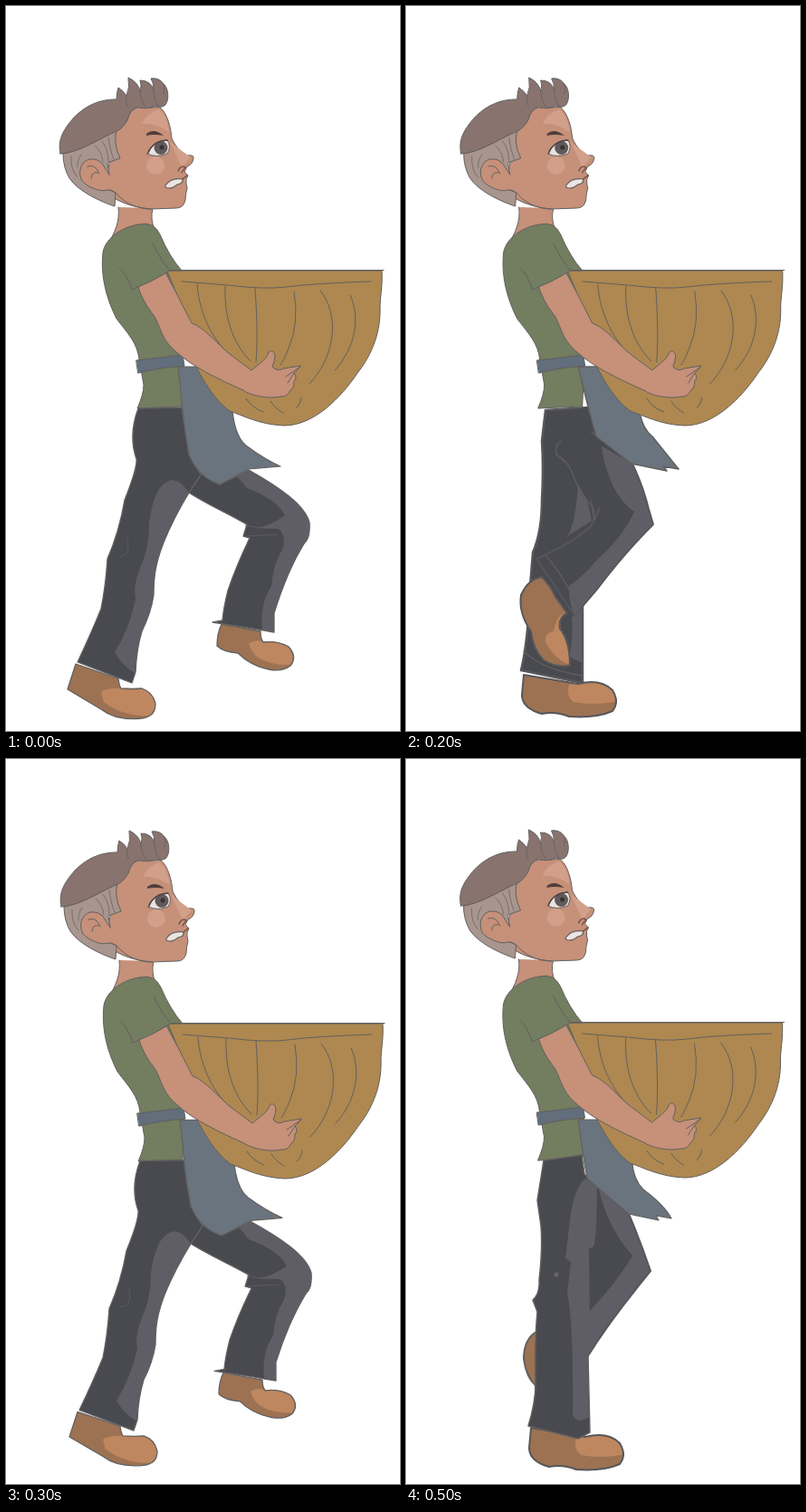
These frames come from a looping animation (435x800 px, 0.6 s). An HTML page:

```html
<!DOCTYPE html>
<html lang="en">
<head>
<meta charset="utf-8">
<title>Walking with a basket</title>
<style>
html, body { margin: 0; width: 100%; height: 100%; overflow: hidden; background: #fff; }
svg { display: block; width: 100%; height: 100%; }
</style>
</head>
<body>
<svg id="stage" viewBox="0 0 435 800" stroke-linejoin="round" stroke-linecap="round"></svg>
<script>
const DARK = '#494950', GREY = '#5f5e67', BOOT = '#9c7253', TAN = '#be875f',
  SKIN = '#c69079', GLOW = '#d2a08a', HAIR = '#88736f', SIDES = '#a8958d',
  SHIRT = '#737d60', CLOTH = '#6a747e', WICKER = '#ae8850', INK = '#62605f';

const fill = (color, d) => `<path fill="${color}" d="${d}"/>`;
const line = (d, w = 1, color = INK) => `<path fill="none" stroke="${color}" stroke-width="${w}" d="${d}"/>`;
const shape = (color, d, w = 1) => fill(color, d) + line(d, w);
const group = (move, s) => `<g transform="${move}">${s}</g>`;
// a shaded part: base, lit side, then the outline over both
const part = (base, lit, d, light, w) => fill(base, d) + fill(lit, light) + line(d, w, w > 1.5 ? '#57575a' : INK);
const leg = (d, light, w) => part(DARK, GREY, d, light, w);
const boot = (d, light, w) => part(BOOT, TAN, d, light, w);
const apron = (d, w = 1) => shape(CLOTH, 'M190 398H212' + d, w);

const torso =
  shape(SKIN, 'M124 222C126 238 120 250 112 264L150 258L164 246Q159 236 162 223') +
  shape(SHIRT, 'M147 241Q163 237 170 252Q180 276 194 292L184 300L190 350L196 398L194 442L145 444Q152 428 152 418L147 390C145 372 135 362 122 345C112 325 104 300 107 272C110 255 130 243 147 241Z');

const belt = shape('#626e7b', 'M144 391L195 385L197 397Q170 399 146 405Z');

const basket =
  shape(WICKER, 'M178 292H415C416 310 413 320 413 333C414 365 400 390 388 405C370 432 340 463 307 463C280 462 262 452 247 447C230 435 217 412 209 396L200 345Z') +
  line('M178 291.5H417M194 304L245 308Q285 313 310 310Q340 306 403 304') +
  line('M211 307C213 335 225 365 246 384M242 309C241 340 248 370 270 392M275 311C277 340 278 370 276 393') +
  line('M318 315Q324 350 312 378Q306 392 303 396M347 314C368 340 365 385 335 417M380 319C392 345 385 378 363 402') +
  line('M265 433Q271 443 284 448M292 436Q297 444 306 449M326 432Q325 440 320 444');

const arm =
  shape(SKIN, 'M145 307Q165 303 176 294Q190 320 205 350C220 355 235 375 247 384L271 402C280 394 288 390 290 382Q294 378 297 385Q297 392 294 398Q300 404 306 400L325 397Q322 402 318 405Q322 410 318 414Q318 422 314 424Q310 432 303 431C290 434 270 430 262 424C235 412 205 398 186 380C170 366 170 350 162 340Q150 325 145 307Z') +
  line('M325 398L309 409M318 405L311 416') +
  fill(SHIRT, 'M125 289Q134 297 139 313Q160 305 181 292L165 262Z') +
  line('M125 289Q134 297 139 313Q160 305 181 292L193 292M162 262Q171 281 181 292');

const head =
  shape(SKIN, 'M122 136L134 126C136 116 142 112 148 112C158 114 166 110 170 112C178 118 182 134 183 146C188 157 194 162 200 165Q208 164 207 168Q206 175 200 177L197 183L201 187Q198 191 199 196L200 201Q198 208 198 214Q196 223 188 223L160 224Q137 222 121 213L110 195Z') +
  fill(GLOW, 'M150 130Q156 117 169 114Q178 122 180 139Q163 128 150 130ZM181 150L204 167L194 178Q188 164 181 150Z') +
  `<circle cx="165" cy="176" r="10" fill="${GLOW}"/>` +
  shape(SIDES, 'M63 163C80 160 100 150 122 136Q118 152 126 168L112 173L114 186L112 202L121 206L120 221C105 216 80 205 70 190Q63 178 63 163Z') +
  line('M98 154Q106 161 107 172M106 149Q113 158 113 171M113 145Q115 160 119 169M72 166Q71 181 79 189M83 164Q78 171 79 178', .7) +
  shape(SKIN, 'M121 206Q116 202 112 203C105 206 90 200 84 193C79 184 82 172 92 169Q102 168 107 175Q110 180 114 186') +
  line('M90 177Q99 174 103 185M94 190Q95 182 101 184M121 206C133 220 148 224 160 224') +
  shape(HAIR, 'M60 163C57 148 62 138 75 123C90 108 105 103 122 103Q122 96 124 90Q130 94 133 99Q137 90 135 79Q146 84 148 94Q150 87 148 82Q160 82 163 93Q163 85 160 80C168 79 172 83 174 86C180 91 180 104 176 109C172 113 167 111 165 110C158 114 148 113 146 111C138 114 136 120 134 126Q128 137 118 140C100 148 80 162 60 163Z') +
  line('M148 94Q148 104 154 111M163 93Q163 103 168 110M174 86Q176 92 174 97M133 99Q131 104 134 110', .8) +
  fill('#4f3d3a', 'M155 141Q163 134 174 143Q163 141 155 143Z') +
  shape('#e9e3df', 'M156 163Q160 150 178 148Q183 155 178 163Q166 168 156 163Z') +
  '<circle cx="171" cy="156.500" r="7.500" fill="#62595a"/><circle cx="172" cy="156" r="2.500" fill="#333"/>' +
  line('M157 162Q162 149 178 148', 1.5, '#4a4141') +
  shape('#ebe4df', 'M176 198Q182 189 195 191Q196 196 189 197Q182 203 176 200Z', 1.2) +
  line('M190 182Q193 175 198 178L194 184M195 191L200 187', 1.3, '#6b4a40');

const stride =
  boot('M238 682L281 690Q281 698 284 702Q300 700 312 707Q322 718 314 728Q305 735 290 732Q270 728 256 714Q240 713 233 706Q233 692 238 682Z',
    'M268 703Q277 698 284 702Q300 700 312 707Q320 718 314 727Q295 728 280 720Q271 715 268 703Z', 1.3) +
  boot('M77 726L124 742Q125 750 127 753Q140 754 150 753Q162 757 165 770Q165 784 150 786C130 788 115 784 105 776L68 754Z',
    'M105 757Q112 752 127 753Q140 754 150 753Q162 757 165 770Q165 780 160 783Q130 785 108 768Z', 1.3) +
  leg('M202 495L215 517L202 537C222 550 245 560 266 572L262 585L269 587C258 610 250 630 245 645Q240 665 239 678L228 680Q255 684 296 691L296 670Q310 625 328 594L331 591Q336 585 335 570C330 550 300 530 268 512L236 528Z',
    'M254 518Q261 525 266 532Q300 545 308 562Q290 575 275 576L301 577Q310 585 305 600Q295 615 293 640Q280 660 283 688L296 691L296 670Q310 625 331 591Q336 585 335 570C330 550 300 530 268 512Z', 1.3) +
  line('M264 573Q285 578 308 574M264 585L299 583', .8) +
  leg('M146 444L194 443L198 470L202 495L215 517L202 537Q185 565 174 592C165 615 163 630 163 650Q160 670 150 690Q144 710 143 735L139 747L79 724Q95 690 105 665Q110 640 112 610Q125 580 131 545Q145 510 144 500C137 480 140 460 146 444Z',
    'M202 537Q188 516 175 527Q163 535 158 570Q158 600 148 620Q140 640 143 655Q135 690 120 713Q128 728 142 736Q144 710 150 690Q160 670 163 650C163 630 165 615 174 592Q185 565 202 537Z', 1.3) +
  line('M134 588Q137 600 131 606L125 608', .8) +
  apron('Q225 428 250 447Q253 475 265 485Q285 500 303 508L268 511L236 528Q212 520 202 495L198 470Q194 440 193 425Z', 1.2);

const reach =
  boot('M15 685Q28 682 40 685Q50 700 58 712L63 732Q55 735 52 740Q62 755 62 778Q50 780 40 775C30 765 22 750 20 730Q5 715 6 700Q8 688 15 685Z',
    'M51 713Q57 722 60 732Q51 735 52 742Q62 755 61 777Q45 770 34 748Q33 737 47 735Z', 2) +
  boot('M293 755Q315 756 340 746Q355 735 370 730Q386 727 388 738Q387 752 375 760Q355 765 340 775Q325 788 305 784Q290 778 291 768Z',
    'M346 743Q355 735 370 730Q386 727 388 738Q385 750 378 753Q360 752 352 765Q345 755 346 743Z', 2) +
  leg('M197 500L204 548Q225 580 231 598Q242 615 239 638L248 645Q250 660 262 675Q280 700 285 725L283 754Q315 755 345 742L340 720Q318 690 303 650Q302 620 290 600Q275 570 270 545L264 505L238 500Z',
    'M251 550Q260 570 268 585Q275 600 275 625Q288 645 290 660Q288 690 296 710Q310 725 318 730L341 722Q318 690 303 650Q302 620 290 600Q275 570 270 534Q262 545 251 550Z', 3) +
  fill(DARK, 'M194 500H262L240 520L204 548Z') +
  leg('M152 443L197 436L201 465Q208 490 238 511L230 523L204 548Q185 595 160 647Q130 670 105 695L62 730L22 664L38 655Q75 650 85 642Q115 610 130 570Q138 540 135 515Q140 480 140 465Q147 450 152 443Z',
    'M203 547L180 545Q165 590 155 612Q140 640 110 655Q80 675 70 690L75 719L105 695Q130 670 160 647Q185 595 203 547Z', 2.5) +
  fill(DARK, 'M198 470L238 508L258 512L238 524L215 530L200 522Z') +
  line('M196 521L208 531L240 519M35 663Q52 683 59 703L69 723M303 737Q325 736 340 729', 1.5, '#5d5c60');

const flatBoot = boot('M130 738L190 748Q215 742 228 755Q236 768 228 778Q210 786 180 784Q165 778 150 781Q128 775 128 760Z',
  'M180 749Q215 742 228 755Q233 765 230 768Q205 772 185 768Q176 762 180 749Z', 2);

const pass =
  flatBoot +
  leg('M154 446L201 443L250 505L215 560L195 650L195 747L127 733Q135 700 137 640L140 603Q150 580 150 545Q152 510 150 480Z',
    'M183 675L195 662L195 725L180 718Q185 700 183 675ZM190 525Q188 570 178 585L205 568Q202 545 190 525Z', 2.5) +
  line('M130 712Q150 732 195 739', 1.5, '#5d5c60') +
  boot('M127 650Q135 632 150 630Q160 640 165 652L178 670Q168 675 170 687Q181 700 181 728Q165 730 152 722Q140 710 138 690Q124 670 127 650Z',
    'M175 669Q168 678 172 690Q181 705 180 726Q165 722 154 702Q152 692 163 690Q165 675 175 669Z', 2) +
  fill(DARK, 'M156 450L201 443L240 495L203 550L168 490Z') +
  leg('M205 470L250 505Q262 530 268 555L273 572Q240 605 210 645L186 673Q165 640 144 610Q185 592 203 575Q212 562 205 550Z',
    'M215 485L250 505Q262 530 268 555L273 572Q240 605 210 645L186 673Q179 655 180 640Q195 630 210 612Q240 585 252 558Q225 540 215 485Z', 1.8) +
  fill(DARK, 'M197 466L215 480L219 510L206 548L190 500Z') +
  line('M171 480Q164 485 166 495Q182 505 186 522Q194 540 205 551L208 568L214 554M155 607Q175 630 186 657', 1.5, '#5d5c60') +
  apron('Q230 430 258 449Q262 468 272 475L301 511L284 508L288 513L249 505L210 475L201 442Z', 1.5);

const swing =
  group('translate(8)', flatBoot) +
  shape(BOOT, 'M144 632Q130 640 130 662Q133 682 142 690L147 700L160 690Z', 2) +
  leg('M200 460L246 502Q258 530 270 565L262 575Q225 620 200 660L185 640Z',
    'M213 475L246 502Q258 530 270 565L262 575Q225 620 200 660L200 612Q235 575 250 548Q224 520 213 475Z', 2) +
  leg('M152 443L194 437L197 458L210 472Q210 520 207 536L201 540Q203 620 201 660L203 743L190 750L135 736Q143 710 143 690Q142 640 145 610L140 597Q148 590 147 575Q151 540 149 515L145 487Z',
    'M182 500Q188 470 198 463L210 472Q210 520 207 538L201 540Q203 620 201 660L202 726Q190 735 184 724Q185 620 178 590L182 555L176 551Z', 1.5) +
  '<circle cx="166" cy="569" r="2.500" fill="#66656a"/>' +
  apron('Q225 428 250 447Q252 465 262 475Q285 492 293 507L276 504L279 509L246 502L200 463L196 440Z', 1.2);

const reachApron = apron('Q225 428 252 447Q256 465 270 478L297 509L268 507L238 511Q205 490 201 465L195 435Z', 2);
const farApron = apron('Q225 430 264 450Q268 475 280 487Q300 495 308 511L275 507L249 514Q215 480 205 465L196 440Z', 2);

// lower body and upper body offset for each step of the walk
const poses = [
  [stride + line('M203 536L214 520', 1), '0 0'],
  [reach + reachApron, '-.5 0'],
  [pass, '.7 0'],
  [group('matrix(1 0 0 .982 2 7.500)', stride), '1 0'],
  [group('translate(9 4)', reach) + farApron, '1 -1'],
  [swing, '.5 -1']
];

const stage = document.getElementById('stage');
stage.innerHTML = poses.map(([lower, at]) => {
  const move = `translate(${at})`;
  return `<g>${group(move, torso)}${lower}${group(move, belt + basket + arm + head)}</g>`;
}).join('');

const steps = [...stage.children];
function draw() {
  const now = Math.floor(performance.now() / 100) % steps.length;
  steps.forEach((g, i) => g.style.display = i === now ? '' : 'none');
  requestAnimationFrame(draw);
}
draw();
</script>
</body>
</html>
```
